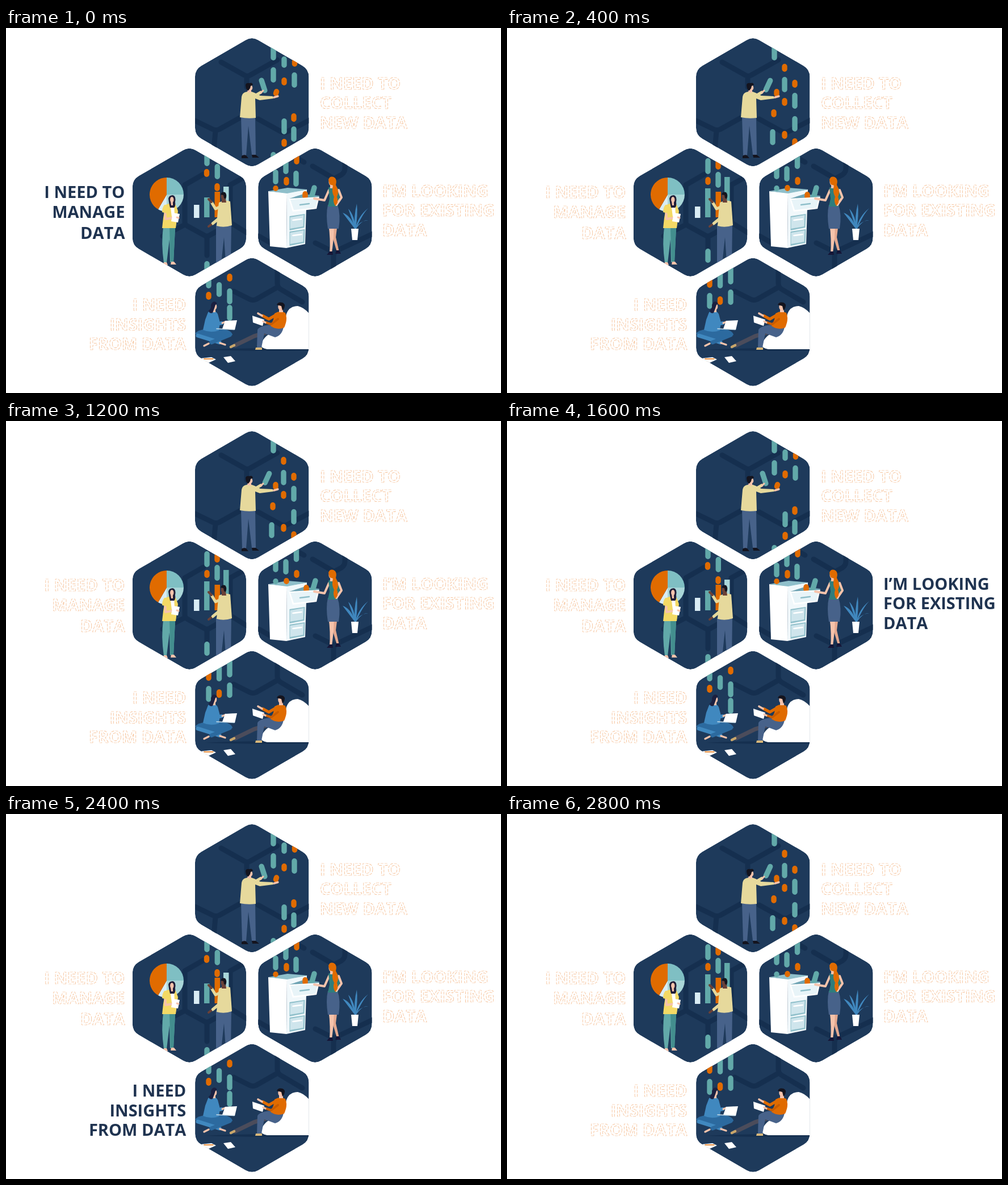
Recreate the animation shown at these times as an HTML page. Size 872 by 642 pixels, loop 3200 ms.

```html
<!DOCTYPE html>
<html lang="en">
<head>
<meta charset="utf-8">
<title>Data needs</title>
<style>
html, body { margin: 0; width: 100%; height: 100%; overflow: hidden; background: #fff; }
svg { display: block; width: 872px; height: 642px; }
text { font: 700 29px "Open Sans", "Noto Sans", sans-serif; font-kerning: none; }
.label { fill: #fff; stroke: #f3b27f; stroke-width: .7; stroke-dasharray: 5 2; }
.label.on { fill: #1f3350; stroke: none; }
</style>
</head>
<body>
<svg id="stage" viewBox="0 0 872 642" xmlns="http://www.w3.org/2000/svg"></svg>
<script>
const C = {
  navy: '#1e3a5b', line: '#152f4f', teal: '#62a9a9', orange: '#e06b00', sand: '#e6d99c',
  slate: '#47628a', skin: '#f6c3ab', brown: '#6b4137', black: '#14141e', white: '#fff',
  pale: '#a9d6d8', ice: '#d9ecf4', blue: '#4088bf', deep: '#2c6a9f', yellow: '#f3d965', green: '#2f7d7c'
};
const STEP = 400, LOOP = 3200;

const shape = (d, fill) => `<path d="${d}" fill="${C[fill] || fill}"/>`;
const poly = (pts, fill) => shape(`M${pts}Z`, fill);
const stroke = (d, color, w) =>
  `<path d="${d}" fill="none" stroke="${C[color] || color}" stroke-width="${w}" stroke-linecap="round" stroke-linejoin="round"/>`;
const oval = (x, y, rx, ry, fill) => `<ellipse cx="${x}" cy="${y}" rx="${rx}" ry="${ry}" fill="${C[fill] || fill}"/>`;
const rect = (x, y, w, h, fill) => `<rect x="${x}" y="${y}" width="${w}" height="${h}" fill="${C[fill] || fill}"/>`;
const pill = (x, top, bottom, fill, turn = 0, w = 9.4) =>
  `<rect x="${x - w / 2}" y="${top}" width="${w}" height="${bottom - top}" rx="${w / 2}" fill="${C[fill]}" transform="rotate(${turn} ${x} ${(top + bottom) / 2})"/>`;
const t = (x, a, b, turn) => pill(x, a, b, 'teal', turn);
const o = (x, a, b, turn) => pill(x, a, b, 'orange', turn);

// Pointy-top hexagon with rounded corners
function hexPath(cx, cy, half = 100.2, r = 22) {
  const R = half / Math.cos(Math.PI / 6), cut = r * Math.tan(Math.PI / 6);
  let d = '';
  for (let i = 0; i < 6; i++) {
    const at = (k) => {
      const a = (k * 60 - 90) * Math.PI / 180;
      return [cx + R * Math.cos(a), cy + R * Math.sin(a)];
    };
    const [p, v, n] = [at(i - 1), at(i), at(i + 1)];
    const toward = q => v.map((c, k) => (c + (q[k] - c) * cut / R).toFixed(2));
    d += `${i ? 'L' : 'M'}${toward(p)}A${r} ${r} 0 0 1 ${toward(n)}`;
  }
  return d + 'Z';
}

function pie(cx, cy, r) {
  const at = deg => {
    const a = (deg - 90) * Math.PI / 180;
    return `${cx + r * Math.cos(a)} ${cy + r * Math.sin(a)}`;
  };
  const slice = (a, b, fill) => shape(`M${cx} ${cy}L${at(a)}A${r} ${r} 0 0 1 ${at(b)}Z`, fill);
  return slice(0, 90, '#7fbfc3') + slice(90, 180, 'pale') + slice(180, 210, 'ice') + slice(210, 360, 'orange');
}

const collect = {
  x: 433.2, y: 130.6,
  lines: 'M379 60L420 83Q425 86 430 83L478 56M424 86V104M333 163L364 178Q370 181 376 178L412 158M369 181L366 215M444 160L484 182Q490 185 496 182L535 162',
  pills: [
    t(471, 28, 57) + t(490, 50, 70) + o(508.5, 54, 68) + t(471, 69, 96) + o(490, 87, 101) + t(508, 78, 105) +
    t(453, 87, 115, -18) + o(476, 107, 120, 18) + o(507, 150, 165) + t(490, 159, 187) + t(507, 173, 200) +
    o(490, 195, 209) + t(471, 218, 245),
    t(471, 28, 57) + o(489, 63, 77) + t(489, 86, 113) + o(507, 91, 105) + t(507, 114, 142) +
    t(460, 87, 114, 25) + o(475, 107, 121) + o(489, 123, 137) + o(470, 143, 157) + t(507, 155, 182) +
    t(468, 178, 206) + o(489, 181, 195) + o(507, 194, 210)
  ],
  front:
    poly('414,156 439,156 440,223 433,223 427,172 423,224 416,224', 'slate') +
    shape('M415 229V225Q419 222 423 224L427 229ZM434 228L433 223H440L446 228Z', 'black') +
    stroke('M437 120L449 113', 'sand', 5) + stroke('M449 114L453 110', 'skin', 3) +
    shape('M421 113Q430 110 438 114L448 119L470 120L471 124L447 127L439 124L440 158Q426 160 412 157L415 121Q416 115 421 113Z', 'sand') +
    stroke('M472 122L479 120', 'skin', 3.4) +
    poly('426,107 432,108 432,114 425,113', 'skin') + oval(430.5, 105, 3.8, 5, 'skin') +
    shape('M422 101Q422 96 429 97Q434 95 435 100L431 102L430 106L427 110Q423 110 422 101Z', 'black')
};

const manage = {
  x: 323, y: 324.4,
  lines: 'M315 305V342Q315 346 319 348L350 365Q354 367 358 365L392 346M354 367V400M315 346L276 366M315 300V276L348 257M395 276V342L424 360M395 276L424 260',
  back: pie(283, 293, 30),
  pills: [
    t(354, 215, 243) + o(353.5, 248, 262) + t(372.3, 239, 266) + o(372, 273, 287) + rect(367.5, 288, 9.5, 45, 'orange') +
    rect(349, 298, 9.5, 35, 'teal') + rect(331, 311, 9.5, 23, 'ice') + rect(383, 279, 9.5, 30, 'pale') + t(354, 410, 437),
    t(354, 229, 257) + o(372, 232, 249) + o(354, 262, 276) + t(372, 253, 281) + rect(367.5, 288, 9.5, 45, 'orange') +
    rect(349, 282, 9.5, 51, 'teal') + rect(331, 314, 9.5, 20, 'ice') + rect(383, 262, 9.5, 46, 'teal') + t(354, 388, 413)
  ],
  front:
    shape('M277 350H298L295 412H289L288 372L283 413H278Q273 378 277 350Z', 'teal') +
    shape('M288 352H298L295 412H290Z', '#438e8e') +
    shape('M278 412H283L285 417H277ZM291 411H296L300 416H290Z', 'skin') +
    shape('M281 311Q290 306 299 311L303 322L299 352H275L277 334Z', 'yellow') +
    poly('289,308 296,308 297,330 292,332', 'white') +
    stroke('M280 318L281 336L293 334', 'skin', 4) + shape('M279 311Q275 316 275 324L284 326L286 311Z', 'yellow') +
    poly('294,325 306,327 303,342 291,340', 'white') + stroke('M301 333L304 334', 'skin', 3) +
    shape('M286 300Q287 294 294 294Q300 296 298 306Q299 314 296 316H289Q287 309 286 300Z', '#221f38') +
    oval(292.3, 302, 3.2, 5, 'skin') + poly('290,305 294,305 294,312 291,312', 'skin') +
    shape('M370 346H397L396 412H387L384 368L379 415H370Z', 'slate') +
    stroke('M376 315L369 318L363 308', 'sand', 5) + stroke('M362 306L357 301', 'brown', 4) +
    stroke('M376 334L364 344', 'sand', 5) + stroke('M361 346L357 349', 'brown', 4) +
    shape('M375 307Q385 301 395 305L398 347Q384 352 371 348L373 322Z', 'sand') +
    poly('380,299 387,300 388,307 380,307', 'brown') + oval(383, 296.5, 4.4, 6, 'brown') +
    shape('M378 293Q380 287 386 289Q390 293 387 301L384 299L383 294Z', 'black')
};

const drawer = (x, y) =>
  poly(`${x},${y} ${x + 27},${y - 4} ${x + 26},${y + 20} ${x},${y + 25}`, '#8fbfca') +
  poly(`${x + 1},${y + 2} ${x + 25},${y - 2} ${x + 24},${y + 18} ${x + 1},${y + 22}`, '#cfe5ec') +
  stroke(`M${x + 6} ${y + 7}L${x + 21} ${y + 5}`, 'white', 2.6);

// Slim leaf from the pot to a tip, curving through (cx, cy)
const leaf = (x, y, cx, cy, w = 4) =>
  shape(`M615 354Q${cx - w} ${cy} ${x} ${y}Q${cx + w} ${cy - w} 616 354Z`, 'blue');

const look = {
  x: 544.4, y: 324.4,
  lines: 'M597 232V247Q597 254 591 258L578 265M578 265L540 243M525 236L500 222M646 362L584 391Q577 394 577 402V440M577 394L545 378M445 366L470 380',
  back:
    poly('462,287 495,290 494,387 465,384', 'white') + poly('495,290 530,284 527,380 494,387', '#f1f8fb') +
    poly('462,287 496,281 531,284 495,291', '#8fbfca') +
    drawer(499.5, 331) + drawer(499.5, 358) +
    poly('499,300 524,292 552,295 550,300', '#6ea3b3'),
  pills: [
    t(475, 249, 275) + o(475, 277, 287) + o(512, 222, 240) + t(493, 222, 257) + o(494, 262, 277) + t(511, 251, 279) +
    o(527, 287, 301) + t(541, 276, 300, 16),
    t(475, 240, 266) + t(475, 277, 287) + t(493, 243, 270) + t(511.5, 220, 248) + o(512, 262, 276) + o(494, 276, 287) +
    o(529, 288, 302) + t(543, 276, 300, 16)
  ],
  front:
    poly('498,300 552,297 547,318 505,323', 'white') + poly('501,302 549,299 545,316 507,320', '#e8f4f8') +
    stroke('M518 311L534 309', '#8fbfca', 2.4) +
    shape('M574 344H584L581 368L587 394H583L575 367Z', '#e3a88f') +
    shape('M568 344H578L577 370L574 396H570Q572 372 568 344Z', 'skin') +
    shape('M565 399L570 393H575L576 399ZM580 397L582 391H587L590 397Z', '#151637') +
    shape('M567 311H584Q590 328 586 353H567Q563 328 567 311Z', 'slate') +
    stroke('M569 285L561 303L543 300', 'skin', 4) +
    shape('M568 281Q576 276 585 282L588 296L584 314H567L570 300Z', 'green') +
    stroke('M586 285L591 298L582 311', 'skin', 4) +
    poly('571,275 577,275 578,282 571,282', 'skin') + oval(572.5, 271, 4, 6, 'skin') +
    shape('M568 267Q570 260 577 262Q584 265 581 276Q588 288 583 297Q587 306 580 313Q575 305 578 297Q573 288 576 277L570 275Z', 'orange') +
    leaf(593, 325, 604, 334) + leaf(638, 317, 624, 331) + leaf(618, 309, 616, 332) +
    leaf(603, 318, 611, 332, 3) + leaf(638, 338, 624, 340, 3) +
    poly('608,353 621,353 619,373 610,373', 'white')
};

const insight = {
  x: 433.3, y: 517.3,
  lines: 'M478 400V449Q478 456 483 459L522 482M478 456L441 477Q435 480 429 477L401 463',
  pills: [
    t(357, 432, 458) + o(357, 464, 478) + t(375.5, 447, 473) + o(394, 432, 446) + t(394, 458, 486) + t(394, 487, 515),
    o(357, 437, 457) + t(375.5, 420, 458) + t(394, 415, 451) + t(357, 466, 494) + o(375.5, 472, 487) + t(394, 460, 487)
  ],
  front:
    shape('M350 566Q440 561 540 565V567Q440 569 350 566Z', 'line') +
    shape('M449 556Q455 540 478 530Q492 515 494 503Q499 489 514 489Q528 492 540 510V565H460Q448 563 449 556Z', 'white') +
    shape('M333 537Q338 531 352 530L381 529Q398 532 399 540L366 548L340 545Z', 'deep') +
    stroke('M338 541L376 553', 'blue', 7) + stroke('M394 540L362 553', 'deep', 7) +
    stroke('M377 554L386 557M357 555L349 559', 'skin', 3.4) +
    shape('M356 500Q366 493 373 503L377 518L375 532Q360 537 347 531L351 513Z', 'blue') +
    stroke('M364 508L367 522L380 519', 'blue', 6) + stroke('M381 519L386 517', 'skin', 3.2) +
    poly('386,515 407,514 403,531 381,529', 'white') + stroke('M371 529L402 530.5', '#c8dce8', 1.6) +
    poly('364,492 369,493 369,500 363,500', 'skin') + oval(367.5, 490, 3.8, 5.5, 'skin') +
    shape('M361 487Q364 479 370 482Q373 485 369 487L367 493L364 501Q358 503 357 497Q362 494 361 487Z', '#1b2040') +
    stroke('M474 531L437 542L404 558', '#4b4c5b', 7.5) + stroke('M402 558L396 561', '#c9a66b', 4.5) +
    shape('M466 522L489 526Q486 541 474 544L455 537L450 562H442L443 531Q446 524 466 522Z', 'slate') +
    shape('M440 562H451V566H439Z', '#d8b779') +
    shape('M473 502Q483 496 492 501Q497 512 490 527Q477 532 466 524L471 513Z', 'orange') +
    stroke('M475 505L463 512L452 506', 'orange', 5) + stroke('M451 506L444 502', 'skin', 3.6) +
    poly('434,506 455,513 452,524 435,518', 'white') + stroke('M479 512L467 521L458 518', '#c95c00', 4) +
    stroke('M457 518L453 516', 'skin', 3.2) +
    poly('481,493 488,493 488,500 481,500', 'skin') + oval(483.5, 490.5, 4.2, 5.6, 'skin') +
    shape('M477 487Q479 481 487 483Q493 485 490 493L487 497L485 489Z', 'black') +
    poly('343,581 362,579 370,583 359,588 350,592', 'white') + stroke('M349 582L365 582', 'orange', 1.4) +
    poly('383,579 396,577 404,586 391,589', 'white')
};

const labels = [
  [209.4, 'end', [298.5, 334, 371], ['I NEED TO', 'MANAGE', 'DATA']],
  [553, 'start', [107.5, 142, 176.6], ['I NEED TO', 'COLLECT', 'NEW DATA']],
  [663, 'start', [296.6, 331.2, 365.8], ['I’M LOOKING', 'FOR EXISTING', 'DATA']],
  [317.2, 'end', [497, 531.6, 566.2], ['I NEED', 'INSIGHTS', 'FROM DATA']]
];

const drawHex = (h, i) => {
  const d = hexPath(h.x, h.y);
  return `<clipPath id="hex${i}"><path d="${d}"/></clipPath><g clip-path="url(#hex${i})">` +
    shape(d, 'navy') + stroke(h.lines, 'line', 9) + (h.back || '') +
    h.pills.map((p, k) => `<g class="pose${k}">${p}</g>`).join('') + h.front + '</g>';
};

const drawLabel = ([x, anchor, ys, rows]) =>
  `<g class="label" text-anchor="${anchor}">` +
  rows.map((row, i) => `<text x="${x}" y="${ys[i]}">${row}</text>`).join('') + '</g>';

const stage = document.getElementById('stage');
stage.innerHTML = [collect, manage, look, insight].map(drawHex).join('') + labels.map(drawLabel).join('');
const poses = [0, 1].map(k => stage.querySelectorAll('.pose' + k));
const texts = stage.querySelectorAll('.label');

function update(ms) {
  const step = Math.floor(ms % LOOP / STEP), pose = step % 2;
  poses.forEach((set, k) => set.forEach(g => g.setAttribute('display', k === pose ? 'inline' : 'none')));
  texts.forEach((g, i) => g.classList.toggle('on', step === i * 2));
}

const start = performance.now();
function frame() {
  update(performance.now() - start);
  requestAnimationFrame(frame);
}
frame();
</script>
</body>
</html>
```
